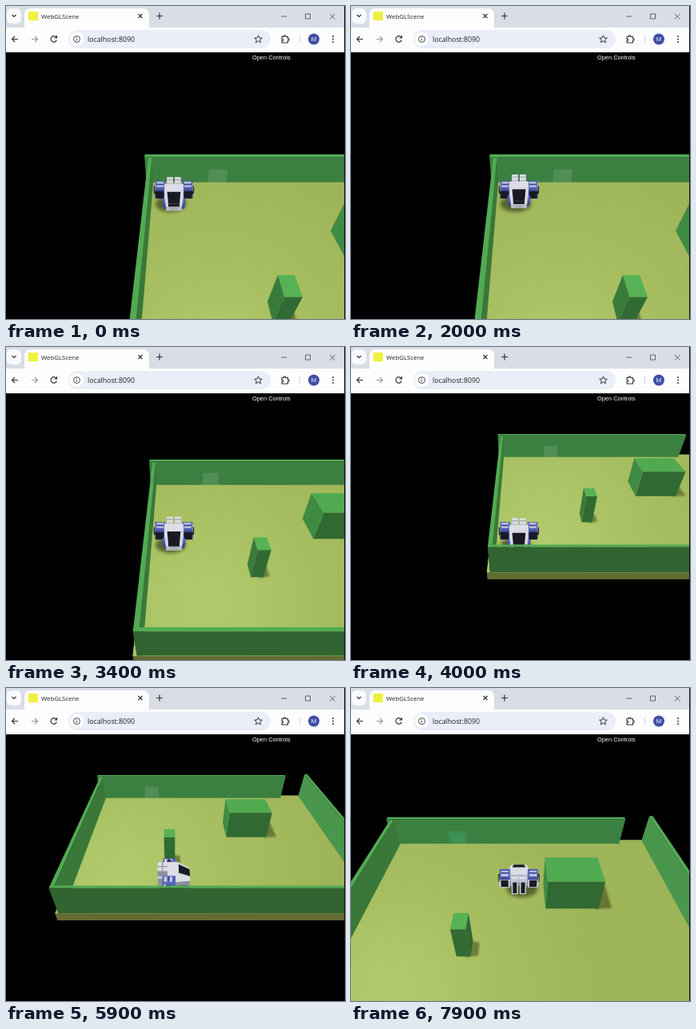
An HTML page with a canvas for the animation above (8 s loop, 424x392 px).

```html
<!DOCTYPE html>
<html lang="en">
<head>
<meta charset="utf-8">
<title>WebGLScene</title>
<style>
html, body { margin: 0; width: 100%; height: 100%; overflow: hidden; background: #000; }
canvas { display: block; width: 424px; height: 392px; }
</style>
</head>
<body>
<canvas id="stage" width="424" height="392"></canvas>
<script>
const g = document.getElementById('stage').getContext('2d');
const LOOP = 8000, STEP = 100, VIEW_TOP = 58;

// ---------- camera: follows the robot, fixed pitch ----------
const F = 375, CX = 210, CY = 235, SIN = 0.6535, COS = 0.757;
const cam = { x: 0, z: 0 };

function project([x, y, z]) {
  const dx = x - cam.x, dz = z - cam.z;
  const k = F / (F - y * SIN + dz * COS);
  return [CX + dx * k, CY - (y * COS + dz * SIN) * k];
}

function poly(points, fill) {
  g.beginPath();
  points.forEach(p => g.lineTo(p[0], p[1]));
  g.closePath();
  g.fillStyle = fill;
  g.fill();
}

const ground = (pts, fill) => poly(pts.map(([x, z]) => project([x, 0, z])), fill);

// Box spans: [x0, x1, y0, y1, z0, z1]; colours: top, near, far, left, right (null = not drawn)
function box([a, b, c, d, e, f], colours, place = p => p) {
  const faces = [
    [[a, d, e], [b, d, e], [b, d, f], [a, d, f]],
    [[a, c, e], [b, c, e], [b, d, e], [a, d, e]],
    [[b, c, f], [a, c, f], [a, d, f], [b, d, f]],
    [[a, c, f], [a, c, e], [a, d, e], [a, d, f]],
    [[b, c, e], [b, c, f], [b, d, f], [b, d, e]]
  ];
  faces.forEach((face, i) => {
    if (!colours[i]) return;
    const [p, q, r, s] = face.map(v => project(place(v)));
    const area = (r[0] - p[0]) * (s[1] - q[1]) - (r[1] - p[1]) * (s[0] - q[0]);
    if (area < 0) poly([p, q, r, s], colours[i]);
  });
}

// ---------- timing ----------
const clamp01 = v => Math.min(1, Math.max(0, v));
const ramp = (t, t0, t1, a, b) => a + (b - a) * clamp01((t - t0) / (t1 - t0));

function pose(t) {
  return {
    x: ramp(t, 5400, 6150, -142, 0),
    z: t < 6000 ? ramp(t, 2900, 3900, 142, -48) : ramp(t, 6650, 7400, -48, 95),
    turn: (180 - ramp(t, 4600, 5000, 0, 90) - ramp(t, 6250, 6550, 0, 90)) * Math.PI / 180,
    lift: 2 - 2 * Math.cos(t * Math.PI * 2 / 800)
  };
}

// ---------- room ----------
const TOP = '#52ab54';
const BLOCKS = [
  { span: [29.5, 88.5, 0, 40, 39, 80], reach: 15, colours: ['#52aa50', '#306931', null, '#408b43', '#306931'] },
  { span: [-59.5, -46, 0, 40.5, -23, -4], reach: 7, colours: ['#57b255', '#316b33', null, '#397b3b', '#2f6831'] }
];

function floor() {
  box([-177, 186, -11, 0, -111.5, 174], ['#a2b95c', '#636b32', null, '#5c652f', '#59612e']);
  const [hx, hy] = project([-110, 0, -58]);
  const glow = g.createRadialGradient(hx, hy, 10, hx, hy, 260);
  glow.addColorStop(0, '#b1cb6c');
  glow.addColorStop(0.45, '#a7bf60');
  glow.addColorStop(1, '#9eb459');
  ground([[-177, -111.5], [186, -111.5], [186, 174], [-177, 174]], glow);
}

function backWall(t) {
  box([-178, 143, 0, 39.5, 165, 171], [TOP, '#3b8040', null, '#3c7d3f', '#377539']);
  const sign = [[-98, 0], [-74, 0], [-74, 21], [-98, 21]].map(([x, y]) => project([x, y, 164.5]));
  const active = t >= 6400;
  poly(sign, active ? 'rgba(70,190,150,.2)' : 'rgba(190,215,190,.17)');
  if (!active) return;
  g.strokeStyle = 'rgba(95,200,165,.45)';
  g.lineWidth = 0.8;
  g.beginPath();
  for (const y of [6, 10, 14]) {
    g.moveTo(...project([-93, y, 164]));
    g.lineTo(...project([-79, y, 164]));
  }
  g.setLineDash([2, 1]);
  g.stroke();
  g.setLineDash([]);
}

function blockShadow({ span: [, x, , , z0, z1], reach }) {
  g.save();
  g.filter = 'blur(1.2px)';
  ground([[x - 5, z0 - 1], [x + reach, z0 + 1], [x + reach, z1 - 3], [x - 4, z1]], 'rgba(60,68,25,.55)');
  g.restore();
}

// ---------- robot: local x right, y up, z forward ----------
const WHITE = '#dcdde6', PALE = '#c3c5d2', BLUE = '#5361bd', NAVY = '#3e489b', DARK = '#191a24', GREY = '#8d8f9a';
const SIZE = 0.93, HOOD = 4;
const all = c => [c, c, c, c, c];
const side = s => (a, b, ...rest) => [Math.min(a * s, b * s), Math.max(a * s, b * s), ...rest];

function armParts(s) {
  const span = side(s);
  return [
    [span(11, 24, 8, 24, -14, 2), [BLUE, NAVY, NAVY, BLUE, BLUE]],
    [span(13, 22, 24, 24.5, -12, -2), all('#c9ccdc')],
    [span(13, 22, 24.6, 24.8, -8, -5), all(NAVY)],
    [span(11, 24, 8, 21, -14.4, -14), [null, '#c9cad6', null, null, null]],
    [span(13, 22, 9, 20, -14.6, -14), [null, DARK, null, null, null]],
    [span(13, 23, 9, 21, 2, 2.5), [null, null, DARK, null, null]],
    [span(24, 25.5, 12, 20, -9, -3), all(DARK)],
    [span(24, 24.4, 10, 22, -12, -10), all(WHITE)]
  ];
}

function thrusterParts(s) {
  const span = side(s);
  return [
    [span(1, 9, 1, 26, -20, -8), [WHITE, PALE, PALE, GREY, GREY]],
    [span(1, 9, 26, 26.3, -15, -13), all('#a5a7b8')],
    [span(2.6, 7.4, 3, 21, -20.4, -20), [null, DARK, null, null, null]],
    [span(9, 9.3, 14, 18, -20, -8), all(PALE)]
  ];
}

const BODY = [
  [[-15, -10, 4, 12, 6, 16], [BLUE, NAVY, NAVY, NAVY, NAVY]],
  [[10, 15, 4, 12, 6, 16], [BLUE, NAVY, NAVY, NAVY, NAVY]],
  [[-12, 12, 4, 11, -8, 20], [null, GREY, '#b9bbc6', GREY, GREY]],
  [[-12, 12, 11, 24, -8, HOOD], [WHITE, PALE, null, WHITE, WHITE]],
  [[-12, 12, 11, 24, HOOD, 20], [WHITE, null, WHITE, WHITE, WHITE]],
  [[-8.5, 8.5, 11, 24, HOOD + 2, 20], [DARK, null, DARK, null, null]],
  [[-6, 6, 5, 11, 20, 20.5], [null, null, '#a9abb5', null, null]]
];

const GROUPS = [
  { mid: [0, 5], bob: true, parts: BODY },
  { mid: [-17, -6], parts: armParts(-1) },
  { mid: [17, -6], parts: armParts(1) },
  { mid: [-5, -14], bob: true, parts: thrusterParts(-1) },
  { mid: [5, -14], bob: true, parts: thrusterParts(1) }
];

function robot(p) {
  const s = Math.sin(p.turn), c = Math.cos(p.turn);
  const spin = (x, z) => [x * c + z * s, z * c - x * s];
  const order = GROUPS.slice().sort((a, b) => spin(...b.mid)[1] - spin(...a.mid)[1]);
  for (const { bob, parts } of order) {
    const place = ([x, y, z]) => {
      // the nose slopes down and narrows ahead of the hood line
      const nose = Math.max(0, z - HOOD);
      const [rx, rz] = spin(x * (1 - nose * 0.012), z);
      const top = nose ? Math.min(y, 24 - nose * 0.5) : y;
      return [p.x + rx * SIZE, top * SIZE + (bob ? p.lift : 0), p.z - 16 + rz * SIZE];
    };
    parts.forEach(([span, colours]) => box(span, colours, place));
  }
}

function robotShadow(turn) {
  g.save();
  g.filter = 'blur(2px)';
  g.fillStyle = 'rgba(55,64,25,.7)';
  g.beginPath();
  g.ellipse(CX + 4 * Math.cos(turn), 250 + 2 * Math.cos(turn), 19, 10, 0, 0, Math.PI * 2);
  g.fill();
  g.restore();
}

function scene(t) {
  const p = pose(t);
  cam.x = p.x;
  cam.z = p.z;
  g.save();
  g.beginPath();
  g.rect(0, VIEW_TOP, 424, 392 - VIEW_TOP);
  g.clip();
  g.fillStyle = '#000';
  g.fillRect(0, VIEW_TOP, 424, 392 - VIEW_TOP);
  floor();
  backWall(t);
  box([-173.5, -169, 0, 38, -111, 165], [TOP, '#2f6331', null, '#397638', '#397838']);
  box([177.5, 182, 0, 40, -111, 173], [TOP, '#2f6331', null, '#4a964c', '#397638']);
  BLOCKS.forEach(blockShadow);
  robotShadow(p.turn);
  const items = BLOCKS.map(b => ({ z: b.span[4], draw: () => box(b.span, b.colours) }));
  items.push({ z: p.z - 36, draw: () => robot(p) });
  items.sort((a, b) => b.z - a.z).forEach(i => i.draw());
  box([-173.5, 139.5, 0, 38, -111, -107.5], [TOP, '#306431', null, '#2f6331', '#2f6331']);
  text('Open Controls', 308, 66.5, '7.4px "Liberation Sans", Arial, sans-serif', '#fff');
  g.restore();
}

// ---------- browser window ----------
function text(str, x, y, font, fill, align = 'left') {
  g.font = font;
  g.fillStyle = fill;
  g.textAlign = align;
  g.fillText(str, x, y);
}

function rounded(x, y, w, h, r, fill) {
  g.beginPath();
  g.roundRect(x, y, w, h, r);
  g.fillStyle = fill;
  g.fill();
}

function disc(x, y, r, fill) {
  g.beginPath();
  g.arc(x, y, r, 0, Math.PI * 2);
  g.fillStyle = fill;
  g.fill();
}

function line(path, colour = '#333', width = 1.2) {
  g.strokeStyle = colour;
  g.lineWidth = width;
  g.stroke(new Path2D(path));
}

function chrome() {
  const sans = 'px "Open Sans", "Noto Sans", sans-serif';
  g.fillStyle = '#d8dde6';
  g.fillRect(0, 0, 424, 28);
  g.fillStyle = '#fdfdfe';
  g.fillRect(0, 27, 424, VIEW_TOP - 27);
  rounded(1, 3, 18, 19, 6, '#f8fafd');
  line('M7.5 11 L10 13.5 L12.5 11');
  rounded(23, 3, 156, 28, 7, '#fdfdfe');
  g.fillStyle = '#eff13f';
  g.fillRect(28, 7, 12, 11);
  text('WebGLScene', 44, 16, '7.8' + sans, '#222');
  line('M165.5 10 l5 5 m0 -5 l-5 5');
  line('M188 12.5 h8 m-4 -4 v8');
  line('M344 13 h7', '#555', 0.9);
  line('M374.5 10 h6 v6 h-6 z', '#555', 0.9);
  line('M405 10 l6.5 6.5 m0 -6.5 l-6.5 6.5', '#555', 0.9);

  line('M15 41.5 h-7.5 m3.5 -3.5 l-3.5 3.5 l3.5 3.5');
  line('M32 41.5 h7.5 m-3.5 -3.5 l3.5 3.5 l-3.5 3.5', '#999');
  line('M63 39.5 A3.7 3.7 0 1 0 63.3 42.5 M63.5 37 v3 h-3');

  rounded(78, 30, 253, 23, 11.5, '#e9eef8');
  disc(88.5, 41.5, 8.5, '#fff');
  line('M92.5 41.5 a4 4 0 1 1 -8 0 a4 4 0 1 1 8 0 M88.5 41 v2.5 M88.5 39 v1', '#444', 1);
  text('localhost:8090', 102, 44.7, '8.75' + sans, '#222');
  line('M315.5 36.8 l1.4 3.1 l3.4 .3 l-2.6 2.2 l.8 3.3 l-3 -1.8 l-3 1.8 l.8 -3.3 l-2.6 -2.2 l3.4 -.3 z', '#333', 1);
  line('M345 38.5 h2.5 v-1.5 h2 v1.5 h3 v2.5 h1.5 v2 h-1.5 v3 h-7.5 v-2.5 h1.5 v-2 h-1.5 z', '#333', 1.1);
  line('M367.5 37 v9', '#c9d5ec', 1);
  disc(385, 41.5, 7, '#3f4fa6');
  text('M', 385, 44.3, '7.5' + sans, '#fff', 'center');
  for (const y of [38, 41.5, 45]) disc(409, y, 1, '#333');
}

function frame(now) {
  const t = Math.floor((now % LOOP) / STEP) * STEP;
  g.clearRect(0, 0, 424, 392);
  chrome();
  scene(t);
  g.fillStyle = '#111';
  g.fillRect(423, 0, 1, 392);
  requestAnimationFrame(frame);
}
requestAnimationFrame(frame);
</script>
</body>
</html>
```
